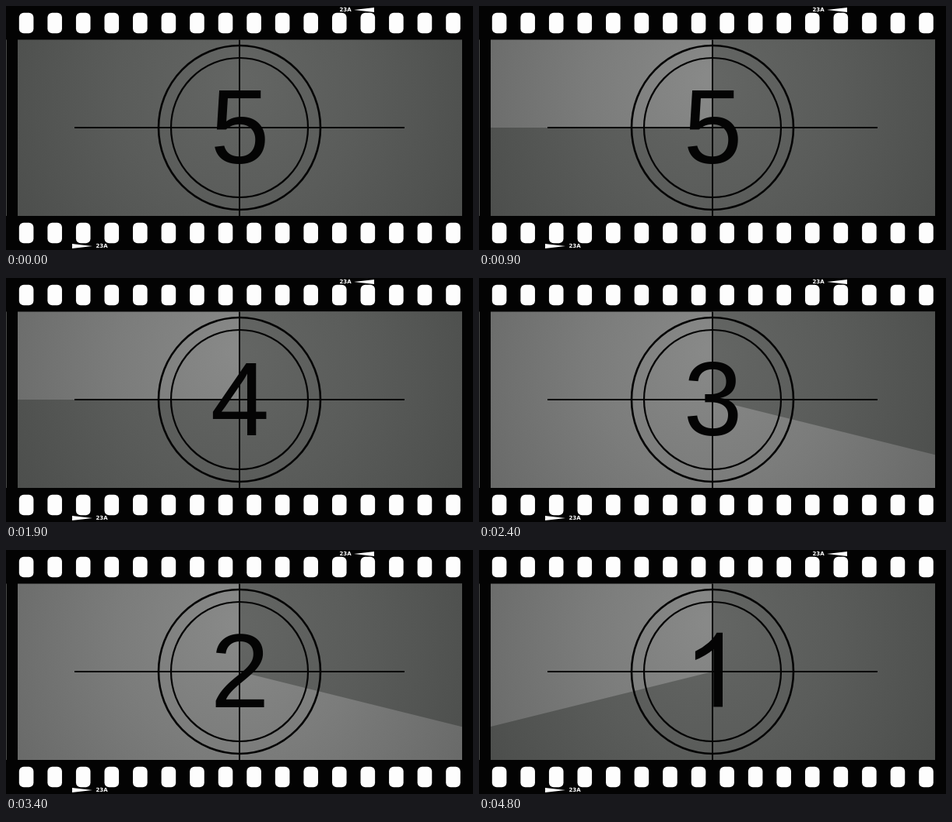
Write an HTML page with a canvas that moves like this. It is 600 px wide and 315 px high and loops after 4900 ms.

```html
<!DOCTYPE html>
<html lang="en">
<head>
<meta charset="utf-8">
<title>Film countdown</title>
<style>
html, body { margin: 0; width: 100%; height: 100%; overflow: hidden; background: #030303; }
canvas { display: block; }
</style>
</head>
<body>
<canvas id="stage" width="600" height="315"></canvas>
<script>
const ctx = document.getElementById('stage').getContext('2d');
const LOOP = 4900, STEP = 100;
const CX = 300, CY = 157;
const PANEL = { x: 15, y: 43.5, w: 571, h: 227.5 };
const INK = '#040404';

// [step, total hand rotation in degrees]; one turn per digit
const TURNS = [[0, -54], [9, 270], [19, 630], [24, 824], [34, 1184], [42, 1482.7], [48, 1696]];

const one = new Path2D('M763 0H583V-1147Q518 -1085 412.5 -1023T223 -930V-1104Q374 -1175 487 -1276T647 -1472H763Z');

function glow(inner, mid, outer) {
  const g = ctx.createRadialGradient(CX, 95, 10, CX, 120, 340);
  g.addColorStop(0, inner);
  g.addColorStop(0.45, mid);
  g.addColorStop(1, outer);
  return g;
}
const light = glow('#888988', '#7b7c7b', '#676867');
const dark = glow('#636563', '#5a5c5a', '#4b4d4b');

function rotation(step) {
  let i = 1;
  while (i < TURNS.length - 1 && step > TURNS[i][0]) i++;
  const [a, from] = TURNS[i - 1], [b, to] = TURNS[i];
  return from + (to - from) * (step - a) / (b - a);
}

function fillPanel(paint) {
  ctx.fillStyle = paint;
  ctx.fillRect(PANEL.x, PANEL.y, PANEL.w, PANEL.h);
}

function drawSweep(deg) {
  if (deg < 0) return fillPanel(dark);
  fillPanel(light);
  ctx.save();
  ctx.beginPath();
  ctx.rect(PANEL.x, PANEL.y, PANEL.w, PANEL.h);
  ctx.clip();
  ctx.beginPath();
  ctx.moveTo(CX, CY);
  ctx.arc(CX, CY, 400, -Math.PI / 2, (deg % 360 - 90) * Math.PI / 180);
  ctx.closePath();
  ctx.fillStyle = dark;
  ctx.fill();
  ctx.restore();
}

function ring(rx, ry, width) {
  ctx.lineWidth = width;
  ctx.beginPath();
  ctx.ellipse(CX, CY, rx, ry, 0, 0, 2 * Math.PI);
  ctx.stroke();
}

function drawTarget() {
  ctx.strokeStyle = ctx.fillStyle = INK;
  ring(104, 106, 2.6);
  ring(88, 90, 2.2);
  ctx.fillRect(88, CY - 1, 424, 2);
  ctx.fillRect(CX - 1, PANEL.y, 2, PANEL.h);
}

function drawDigit(n) {
  ctx.fillStyle = INK;
  if (n === 1) {
    ctx.save();
    ctx.translate(263.4, 202.5);
    ctx.scale(0.065, 0.065);
    ctx.fill(one);
    ctx.restore();
    return;
  }
  ctx.font = '136px "Liberation Sans", Arial, sans-serif';
  ctx.textAlign = 'center';
  ctx.fillText(n, 300.5, 202.5);
}

function triangle(tip, base, y) {
  ctx.beginPath();
  ctx.moveTo(tip, y);
  ctx.lineTo(base, y - 3);
  ctx.lineTo(base, y + 3);
  ctx.fill();
}

function drawFilm() {
  ctx.fillStyle = '#030303';
  ctx.fillRect(0, 0, 600, 315);
  ctx.fillStyle = '#484948';
  ctx.fillRect(0, PANEL.y, 1, PANEL.h);
  ctx.fillStyle = '#fdfdfd';
  for (let i = 0; i < 16; i++) {
    for (const y of [8.7, 279.7]) {
      ctx.beginPath();
      ctx.roundRect(16.8 + i * 36.56, y, 18.6, 26.6, 6);
      ctx.fill();
    }
  }
  triangle(447, 473, 5);
  triangle(111, 85, 310);
  ctx.font = 'bold 7px "DejaVu Sans", sans-serif';
  ctx.textAlign = 'left';
  ctx.fillText('23A', 428.5, 7.4);
  ctx.fillText('23A', 115.5, 312.4);
}

function draw(now) {
  const step = Math.floor((now % LOOP) / STEP);
  const deg = rotation(step);
  drawFilm();
  drawSweep(deg);
  drawTarget();
  drawDigit(5 - Math.max(0, Math.floor(deg / 360)));
}

const start = performance.now();
function tick() {
  draw(performance.now() - start);
  requestAnimationFrame(tick);
}
tick();
</script>
</body>
</html>
```
